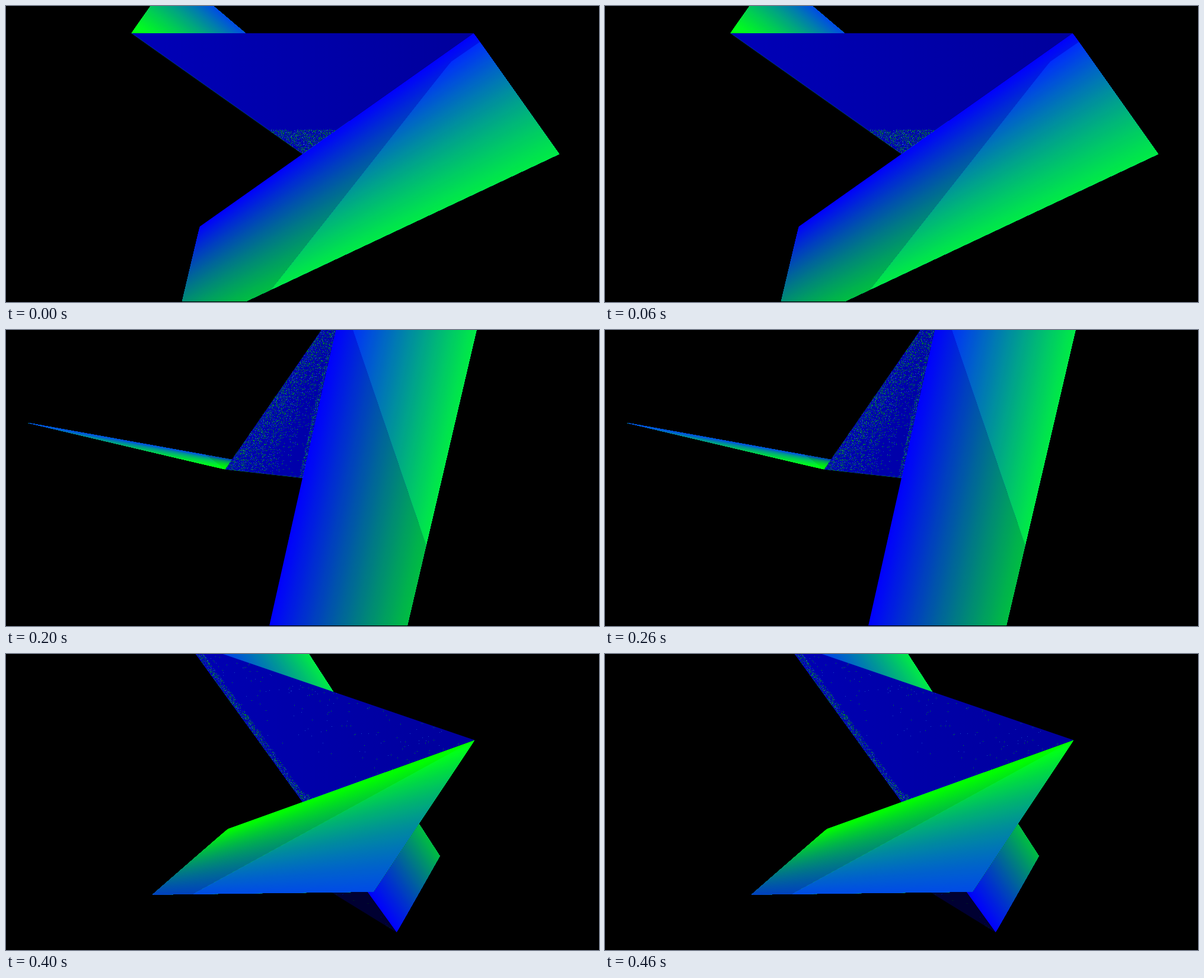
Write an HTML page with a canvas that moves like this. It is 1000 px wide and 500 px high and loops after 0.5 s.

```html
<!DOCTYPE html>
<html lang="en">
<head>
<meta charset="utf-8">
<title>Turning wings</title>
<style>
  html, body { margin: 0; width: 100%; height: 100%; overflow: hidden; background: #000; }
  canvas { display: block; width: 100vw; height: 100vh; }
</style>
</head>
<body>
<canvas id="stage" width="1000" height="500"></canvas>
<script>
const W = 1000, H = 500;
const STEP = 100, STEPS = 5;      // half a turn per loop
const FOCAL = 612, ROOT2 = Math.SQRT2;
const ctx = document.getElementById('stage').getContext('2d');
let angle = 0;

// Camera at (0, 2, 2) looks at the origin; the model turns about the y axis
function project([x, y, z]) {
  const c = Math.cos(angle), s = Math.sin(angle);
  const right = x * c + z * s, near = z * c - x * s;
  const depth = 2 * ROOT2 - (near + y) / ROOT2;
  const k = FOCAL / depth;
  return [W / 2 + k * right, H / 2 + k * (near - y) / ROOT2, depth];
}

function trace(pts) {
  ctx.beginPath();
  pts.forEach(p => ctx.lineTo(p[0], p[1]));
  ctx.closePath();
}

const blend = (a, b, t) => `rgb(${a.map((v, i) => Math.round(v + (b[i] - v) * t))})`;

// A wing is a sheet beside a diagonal: s runs along it, z away from it
const wingPoint = (side, s, z) => project([side * s, s, side * z]);

function shade(side, from, to, inner, z0 = 0) {
  const n = 100;
  for (let i = 0; i < n; i++) {
    const z = z0 + (1 - z0) * i / n;
    trace([
      wingPoint(side, 1, z), wingPoint(side, inner(z), z),
      wingPoint(side, inner(1), 1), wingPoint(side, 1, 1)
    ]);
    ctx.fillStyle = blend(from, to, z + .5 / n);
    ctx.fill();
  }
}

const whole = () => -1;
const lit = z => 1 - 1.19 * z;

function blueWing() {
  shade(1, [0, 0, 255], [0, 190, 65], whole);
  shade(1, [0, 22, 275], [0, 235, 70], lit, .105);
  glow();
}

function greenWing() {
  shade(-1, [0, 265, -10], [0, 65, 190], whole);
  shade(-1, [0, 270, 10], [0, 75, 230], lit);
}

// Highlight that flares only near one viewing angle
function glow() {
  const power = Math.max(0, Math.cos(angle - .6 * Math.PI)) ** 40;
  if (power < .01) return;
  const [x, y] = wingPoint(1, .305, .643);
  const level = r => 230 * power * Math.exp(-((r / 42) ** 2));
  ctx.save();
  trace([[1, 0], [1, 1], [-1, 1], [-1, 0]].map(([s, z]) => wingPoint(1, s, z)));
  ctx.clip();
  ctx.globalCompositeOperation = 'lighter';
  for (let r = 78; r > 0; r -= 6) {
    const v = Math.round(level(r) - level(r + 6));
    ctx.fillStyle = `rgb(${v}, ${v}, ${v})`;
    ctx.beginPath();
    ctx.arc(x, y, r, 0, 2 * Math.PI);
    ctx.fill();
  }
  ctx.restore();
}

// Triangle between the diagonals, above (up = 1) or below (up = -1) the hub
function plate(up, fill, specks, density) {
  const p = project([-1, up, 0]), q = project([1, up, 0]);
  trace([[W / 2, H / 2], p, q]);
  ctx.fillStyle = fill;
  ctx.fill();

  let seed = 7;
  const rand = () => (seed = (seed * 16807) % 2147483647) / 2147483647;
  const px = p[0] - W / 2, py = p[1] - H / 2;
  const qx = q[0] - W / 2, qy = q[1] - H / 2;
  const area = px * qy - py * qx;
  const low = n => Math.max(0, Math.floor(Math.min(H / 2 * n, p[2 - n], q[2 - n])));
  const high = n => Math.min(H * n, Math.max(H / 2 * n, p[2 - n], q[2 - n]));
  for (let y = low(1); y < high(1); y++) {
    for (let x = low(2); x < high(2); x++) {
      const dx = x + .5 - W / 2, dy = y + .5 - H / 2;
      const a = (dx * qy - dy * qx) / area, b = (px * dy - py * dx) / area;
      if (a < 0 || b < 0 || a + b > 1) continue;
      // Perspective-correct shares of both far corners
      const u = a / p[2], v = b / q[2];
      const sum = u + v + (1 - a - b) / (2 * ROOT2);
      if (rand() < density(u / sum, v / sum)) {
        ctx.fillStyle = specks[rand() < .62 ? 0 : 1];
        ctx.fillRect(x, y, 1, 1);
      }
    }
  }
}

function plates() {
  const turn = Math.abs(Math.sin(angle)), edgeOn = turn ** 8;
  const hub = .25 * Math.cos(angle) ** 4;
  const navy = ctx.createLinearGradient(200, 0, 800, 0);
  navy.addColorStop(0, 'rgb(0, 0, 184)');
  navy.addColorStop(1, 'rgb(0, 0, 155)');

  plate(-1, 'rgb(0, 0, 50)', ['#003c0c', '#00006e'], () => .3 * edgeOn);
  plate(1, navy, ['#00961a', '#1846c8'], (u, v) =>
    u + v < hub || 2 * u < .18 * turn ? .27 : .4 * edgeOn * (u + v) ** 3);
}

function draw(step) {
  angle = step * Math.PI / STEPS;
  ctx.fillStyle = '#000';
  ctx.fillRect(0, 0, W, H);
  const order = [greenWing, plates, blueWing];
  if (Math.cos(angle) < 0) order.reverse();
  order.forEach(part => part());
  ctx.fillStyle = '#000';
  ctx.fillRect(0, H - 1, W, 1);
}

const start = performance.now();
let shown = -1;

function tick() {
  const step = Math.floor((performance.now() - start) / STEP) % STEPS;
  if (step !== shown) draw(shown = step);
  requestAnimationFrame(tick);
}
tick();
</script>
</body>
</html>
```
